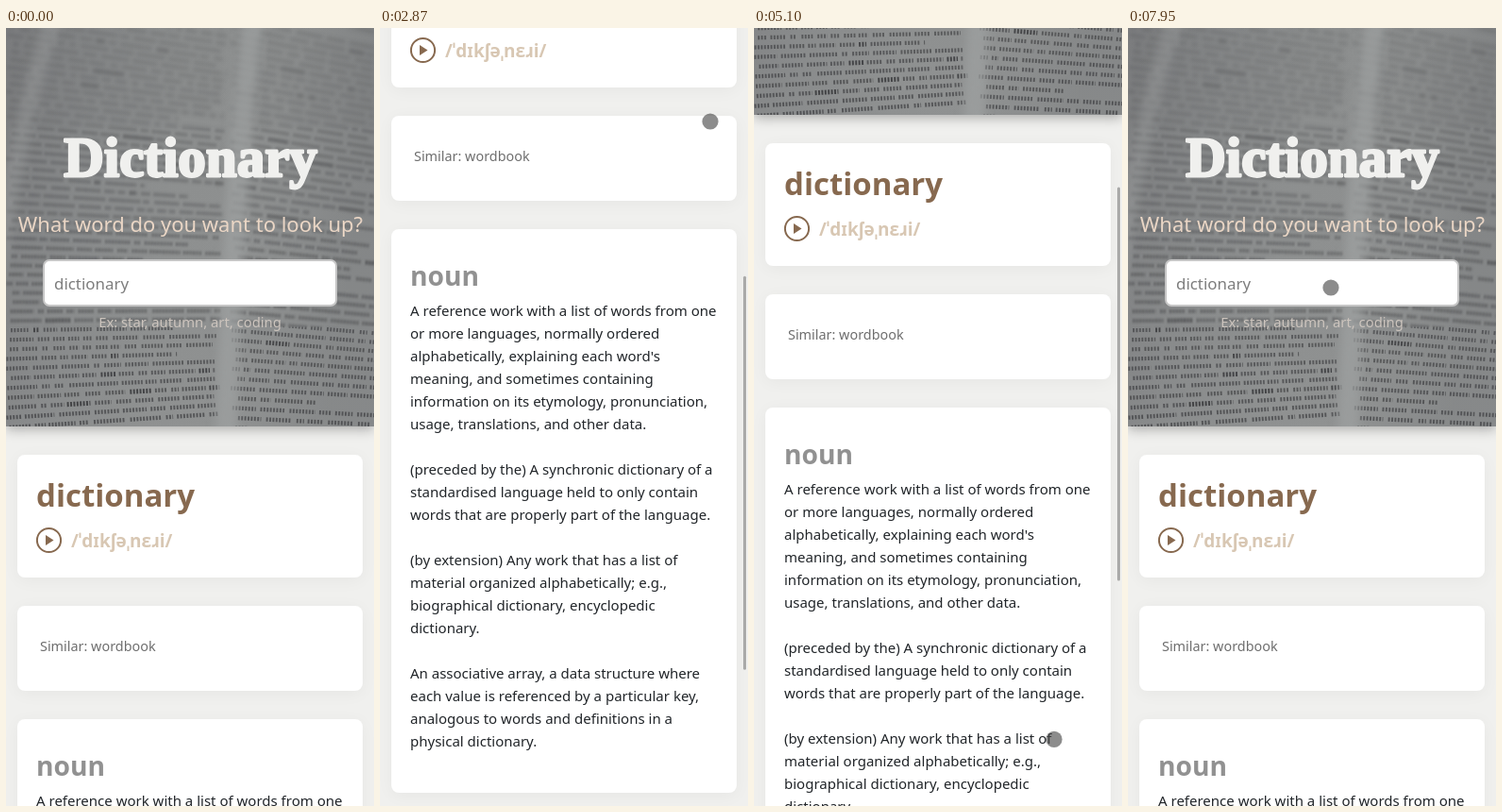
Write an HTML page with a canvas that moves like this. It is 390 px wide and 824 px high and loops after 8000 ms.

```html
<!DOCTYPE html>
<html lang="en">
<head>
<meta charset="utf-8">
<title>Dictionary</title>
<style>
html, body { margin: 0; width: 100%; height: 100%; overflow: hidden; background: #f0f0ee; }
canvas { display: block; width: 390px; height: 824px; }
</style>
</head>
<body>
<canvas id="stage"></canvas>
<script>
const W = 390, H = 824, PAGE_H = 1700, HEAD = 422, LOOP = 8000;
const BG = '#f0f0ee', BROWN = '#87694f';
const SANS = '"Noto Sans", "Open Sans", sans-serif';
const dpr = window.devicePixelRatio || 1;

function setup(canvas, w, h) {
  canvas.width = w * dpr;
  canvas.height = h * dpr;
  const c = canvas.getContext('2d');
  c.scale(dpr, dpr);
  return c;
}
const stage = document.getElementById('stage');
const ctx = setup(stage, W, H);
const page = document.createElement('canvas');
const pg = setup(page, W, PAGE_H);

const lerp = (a, b, k) => a + (b - a) * k;
const clamp = (v, a, b) => Math.min(b, Math.max(a, v));

function randomizer(seed) {
  return () => (seed = (seed * 16807) % 2147483647) / 2147483647;
}

function text(str, x, y, size, color, weight = 400, align = 'left') {
  pg.font = `${weight} ${size}px ${SANS}`;
  pg.fillStyle = color;
  pg.textAlign = align;
  pg.fillText(str, x, y);
}

function shadow(color, blur, dy) {
  pg.shadowColor = color;
  pg.shadowBlur = blur * dpr;
  pg.shadowOffsetY = dy * dpr;
}

function box(x, y, w, h, r) {
  pg.beginPath();
  pg.roundRect(x, y, w, h, r);
}

function card(y, h) {
  pg.save();
  shadow('rgba(0,0,0,.045)', 18, 3);
  pg.fillStyle = '#fff';
  box(12, y, 366, h, 8);
  pg.fill();
  pg.restore();
}

// Rows of short dashes suggest print on a curved book page.
function printRows(c, rnd, x0, x1, topSlope, endSlope) {
  c.setLineDash([1.9, 1.5]);
  for (let y = -60; y < 450;) {
    const k = clamp(y / HEAD, 0, 1);
    const slope = lerp(topSlope, endSlope, k);
    const right = x1 + 10 * (1 - k) - (rnd() < 0.25 ? rnd() * 90 : rnd() * 8);
    for (let x = x0 + rnd() * 8; x < right;) {
      const end = Math.min(right, x + 6 + rnd() * 28);
      const bold = rnd() < 0.05 ? 0.2 : 0;
      c.lineWidth = lerp(3.4, 4.4, k) + bold * 3;
      c.strokeStyle = `rgba(40,40,43,${lerp(0.34, 0.56, k) + bold})`;
      c.beginPath();
      c.moveTo(x, y + (x - x0) * slope);
      c.lineTo(end, y + (end - x0) * slope);
      c.stroke();
      x = end + 3 + rnd() * 2.5;
    }
    y += lerp(8.4, 10.6, k);
  }
}

function gradient(x, y, stops) {
  const g = pg.createLinearGradient(0, 0, x, y);
  stops.forEach((color, i) => g.addColorStop(i / (stops.length - 1), color));
  return g;
}

function lightBand(topX, endX, width, alpha) {
  pg.lineWidth = width;
  pg.strokeStyle = `rgba(158,160,160,${alpha})`;
  pg.beginPath();
  pg.moveTo(topX, -20);
  pg.quadraticCurveTo(lerp(topX, endX, 0.75), 180, endX, 440);
  pg.stroke();
}

function photo() {
  pg.save();
  shadow('rgba(0,0,0,.3)', 12, 3);
  pg.fillStyle = '#858787';
  pg.fillRect(0, 0, W, HEAD);
  pg.restore();

  pg.save();
  pg.beginPath();
  pg.rect(0, 0, W, HEAD);
  pg.clip();
  pg.fillStyle = gradient(W, 50, ['#78797b', '#848687', '#8b8d8d', '#8c8e8e', '#7f8182']);
  pg.fillRect(0, 0, W, HEAD);
  pg.fillStyle = gradient(0, HEAD, ['rgba(150,152,152,.1)', 'rgba(150,152,152,.35)']);
  pg.fillRect(0, 0, W, HEAD);

  const print = document.createElement('canvas');
  const c = setup(print, W, HEAD);
  const rnd = randomizer(41);
  printRows(c, rnd, 0, 226, 0.15, -0.065);
  printRows(c, rnd, 238, 400, 0.2, 0.045);

  // The far part of the page is out of focus.
  const bands = 4, bandH = HEAD / bands;
  for (let i = 0; i < bands; i++) {
    pg.save();
    pg.beginPath();
    pg.rect(0, i * bandH, W, bandH);
    pg.clip();
    pg.filter = `blur(${lerp(2, 0.35, i / (bands - 1)) * dpr}px)`;
    pg.drawImage(print, 0, 0, W, HEAD);
    pg.restore();
  }

  pg.filter = `blur(${5 * dpr}px)`;
  lightBand(262, 233, 22, 0.75);
  lightBand(52, -30, 18, 0.4);
  pg.restore();
}

function header() {
  photo();
  pg.font = '700 59px "Liberation Serif", "Noto Serif", serif';
  pg.textAlign = 'center';
  pg.fillStyle = pg.strokeStyle = '#f0f0ee';
  pg.lineWidth = 2.8;
  pg.lineJoin = 'round';
  pg.fillText('Dictionary', 195.5, 156.5);
  pg.strokeText('Dictionary', 195.5, 156.5);
  text('What word do you want to look up?', 195.5, 216, 22, '#ead6c5', 400, 'center');

  box(40, 246, 310, 48, 6);
  pg.fillStyle = '#fff';
  pg.fill();
  pg.lineWidth = 2;
  pg.strokeStyle = '#c6c6c6';
  pg.stroke();
  text('dictionary', 51, 276.5, 16.9, '#7d7d7d');
  text('Ex: star, autumn, art, coding', 195, 316.5, 14.8, '#cdc5be', 400, 'center');
}

function wordCard() {
  card(452, 130);
  text('dictionary', 32, 507, 33, BROWN, 700);
  pg.strokeStyle = pg.fillStyle = BROWN;
  pg.lineWidth = 2;
  pg.beginPath();
  pg.arc(45.5, 542.5, 12.6, 0, Math.PI * 2);
  pg.stroke();
  pg.beginPath();
  pg.moveTo(42, 537);
  pg.lineTo(50.5, 542.5);
  pg.lineTo(42, 548);
  pg.fill();
  text('/ˈdɪkʃəˌnɛɹi/', 69, 550, 19, '#d8c7b3', 600);
}

function entry(y, h, title, lines) {
  card(y, h);
  text(title, 32, y + 60, 28.2, '#919191', 700);
  lines.forEach((line, i) => text(line, 32, y + 92 + i * 24, 15, '#212529'));
}

function centered(runs, y) {
  const font = bold => `${bold ? 700 : 400} 12.1px ${SANS}`;
  const widths = runs.map(([str, bold]) => {
    pg.font = font(bold);
    return pg.measureText(str).width;
  });
  let x = 195 - widths.reduce((a, b) => a + b, 0) / 2;
  runs.forEach(([str, bold], i) => {
    text(str, x, y, 12.1, bold ? '#3a2a20' : '#212529', bold ? 700 : 400);
    x += widths[i];
  });
}

const NOUN = `A reference work with a list of words from one
or more languages, normally ordered
alphabetically, explaining each word's
meaning, and sometimes containing
information on its etymology, pronunciation,
usage, translations, and other data.

(preceded by the) A synchronic dictionary of a
standardised language held to only contain
words that are properly part of the language.

(by extension) Any work that has a list of
material organized alphabetically; e.g.,
biographical dictionary, encyclopedic
dictionary.

An associative array, a data structure where
each value is referenced by a particular key,
analogous to words and definitions in a
physical dictionary.`.split('\n');

const VERB = `To look up in a dictionary.

To add to a dictionary.

To compile a dictionary.`.split('\n');

function buildPage() {
  pg.fillStyle = BG;
  pg.fillRect(0, 0, W, PAGE_H);
  header();
  wordCard();
  card(612, 90);
  text('Similar: wordbook', 36, 660, 14.4, '#6e6e6e');
  entry(732, 597, 'noun', NOUN);
  entry(1359, 238, 'verb', VERB);
  centered([['This project was coded by ', 0], ['Maribel Tovin', 1], [' and is ', 0], ['open-sourced on', 1]], 1621.5);
  centered([['Quovel', 1], [' and hosted on ', 0], ['Brimvok', 1]], 1641.5);
}

const EASE = {
  lin: k => k,
  in: k => 1 - Math.cos(k * Math.PI / 2),
  out: k => Math.sin(k * Math.PI / 2),
  io: k => (1 - Math.cos(k * Math.PI)) / 2
};

// Finger path: time, x, y, easing into the point.
const PATH = [
  [640, 369, 197], [900, 279, 380, 'io'], [1050, 289, 425, 'out'],
  [1540, 289, 425], [2010, 298, 633, 'io'], [2130, 298, 633],
  [2480, 325, 337, 'in'], [2870, 350, 99, 'out'], [3180, 350, 99],
  [3590, 255, 579, 'io'], [3700, 255, 579], [3830, 258, 463, 'in'],
  [4150, 303, 105, 'out'], [4420, 303, 105], [4620, 305, 115, 'in'],
  [5330, 322, 950, 'io'], [6455, 322, 950],
  [6456, 345, 330], [6540, 330, 363], [6930, 321, 623, 'io'],
  [7080, 321, 623], [7860, 215, 275, 'io'], [LOOP, 215, 275]
];

function finger(t) {
  const i = PATH.findIndex(p => p[0] > t);
  if (i < 1) return { x: PATH[0][1], y: PATH[0][2] };
  const a = PATH[i - 1], b = PATH[i];
  const k = EASE[b[3] || 'lin']((t - a[0]) / (b[0] - a[0]));
  return { x: lerp(a[1], b[1], k), y: lerp(a[2], b[2], k) };
}

const MAX = 821, PULL = 0.247;

function scrollAt(t, y) {
  let s;
  if (t < 2100) s = 0;
  else if (t < 3000) s = Math.max(0, 618 - y);
  else if (t < 3690) s = 519;
  else if (t < 3830) s = Math.max(519, 1083 - y);
  else if (t < 6456) s = 1083 - y;
  else if (t < 7080) s = Math.min(133, 511 - y);
  else s = -112 * Math.exp(-(t - 7080) / 80);
  if (s < 0) s *= PULL;
  if (s > MAX) s = MAX + (s - MAX) * PULL;
  return Math.round(s);
}

const inside = (t, spans) => spans.find(([a, b]) => t >= a && t < b);
const BAR = [[2150, 3590], [3720, 5970], [6530, 7860]];
const PRESSED = [[2100, 3000], [3690, 5400], [6500, 7080], [7950, LOOP]];
const SHOWN = [[660, 5330], [6460, LOOP]];

function scrollbar(t, s) {
  const span = inside(t, BAR);
  if (!span) return;
  const top = 4 + clamp(s, 0, MAX) * 0.4985;
  const alpha = Math.min(1, (t - span[0]) / 60, (span[1] - t) / 270);
  ctx.fillStyle = `rgba(128,128,128,${0.62 * alpha})`;
  ctx.beginPath();
  ctx.roundRect(385, top, 3, Math.min(823, top + 417) - top, 1.5);
  ctx.fill();
}

function draw(t) {
  const f = finger(t), s = scrollAt(t, f.y);
  ctx.fillStyle = BG;
  ctx.fillRect(0, 0, W, H);
  ctx.drawImage(page, 0, -s, W, PAGE_H);
  scrollbar(t, s);
  if (inside(t, SHOWN)) {
    ctx.fillStyle = `rgba(70,70,70,${inside(t, PRESSED) ? 0.62 : 0.5})`;
    ctx.beginPath();
    ctx.arc(f.x, f.y, 8.6, 0, Math.PI * 2);
    ctx.fill();
  }
}

buildPage();
const start = performance.now();
function tick() {
  draw((performance.now() - start) % LOOP);
  requestAnimationFrame(tick);
}
tick();
</script>
</body>
</html>
```
